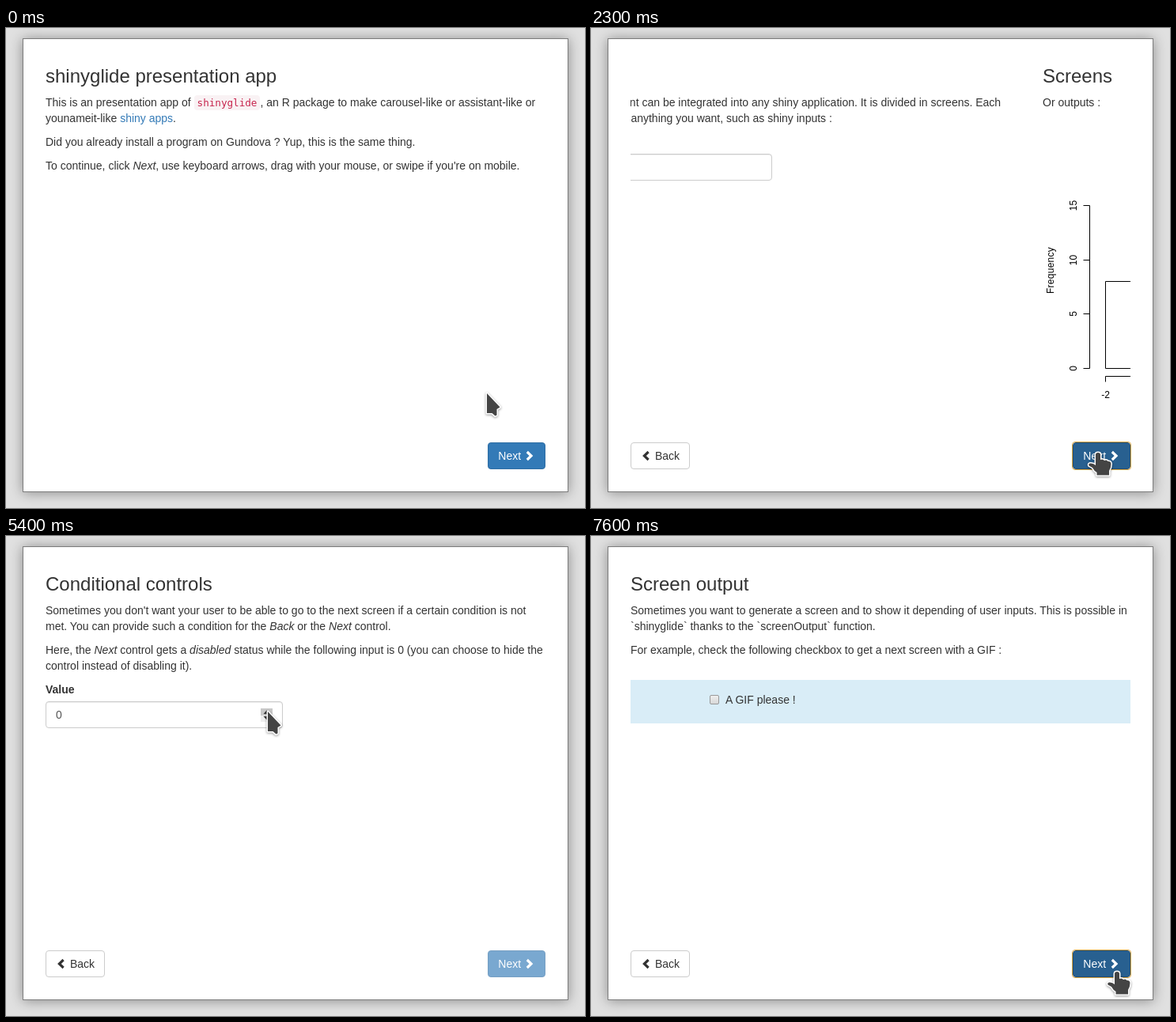
An HTML page that plays this animation: 732x607 px, repeating every 8000 ms.

```html
<!DOCTYPE html>
<html lang="en">
<head>
<meta charset="utf-8">
<title>Carousel app demo</title>
<style>
html, body { margin: 0; width: 100%; height: 100%; overflow: hidden; }
body { position: relative; background: #e0e0e0; color: #333; font: 14px/20px "Liberation Sans", Arial, sans-serif; }
* { box-sizing: border-box; }
.panel { position: absolute; left: 21px; top: 13px; width: 690px; height: 574px; background: #fff; border: 1px solid #7c7c7c; box-shadow: 0 1px 15px rgba(0,0,0,.38); }
.view { position: absolute; left: 50px; top: 0; width: 632px; height: 520px; overflow: hidden; }
.track { position: absolute; left: 0; top: 0; height: 520px; }
.slide { position: absolute; top: 0; width: 632px; height: 520px; padding-top: 47.6px; white-space: nowrap; }
h3 { margin: 0 0 10px; font-size: 24px; font-weight: 400; line-height: 26.4px; }
p { margin: 0 0 10px; }
a { color: #337ab7; }
code { font: 12.6px/1 "DejaVu Sans Mono", monospace; padding: 2px 4px; color: #c7254e; background: #f9f2f4; border-radius: 4px; }
.label { font-weight: 700; margin-bottom: 5px; }
.input { position: relative; width: 300px; height: 34px; padding: 6px 12px; color: #555; background: #fff; border: 1px solid #ccc; border-radius: 4px; box-shadow: inset 0 1px 1px rgba(0,0,0,.075); }
.input.focus { border-color: #66afe9; }
.input.glow { box-shadow: inset 0 1px 1px rgba(0,0,0,.075), 0 0 8px rgba(102,175,233,.6); }
.caret { position: absolute; left: 20px; top: 8px; width: 1px; height: 16px; background: #222; }
.spin { position: absolute; left: 271px; top: 8px; }
.bar { position: absolute; left: 0; top: 182px; width: 632px; height: 55px; background: #d9edf7; padding: 15px 0 0 120px; }
.box { position: absolute; left: 100px; top: 19px; width: 12px; height: 12px; border: 1px solid #999; border-radius: 2px; background: linear-gradient(#eee, #d8d8d8); }
.btn { position: absolute; top: 524px; height: 34px; padding: 6px 12px; border: 1px solid #ccc; border-radius: 4px; background: #fff; white-space: nowrap; }
.btn svg { width: 14px; height: 14px; vertical-align: -2px; fill: none; stroke: currentColor; stroke-width: 3.2; }
#back { left: 50px; }
#next { right: 50px; color: #fff; background: #337ab7; border-color: #2e6da4; }
#next.hover { background: #286090; border-color: #204d74; }
#next.off { opacity: .65; }
#ring { position: absolute; left: 608px; top: 523px; width: 75px; height: 36px; border: 1.5px solid #d9a441; border-radius: 4px; }
.wrap { position: absolute; left: 0; top: 0; width: 732px; height: 607px; overflow: hidden; }
#mouse { position: absolute; left: 0; top: 0; filter: drop-shadow(0 1px 1.5px rgba(0,0,0,.4)); }
.plot { position: absolute; left: 0; top: 0; font: 12px "Liberation Sans", Arial, sans-serif; }
</style>
</head>
<body>
<div class="wrap">
  <div class="panel"></div>
  <div class="view"><div class="track" id="track">
    <div class="slide">
      <h3>shinyglide presentation app</h3>
      <p>This is an presentation app of <code>shinyglide</code>, an R package to make carousel-like or assistant-like or<br>younameit-like <a>shiny apps</a>.</p>
      <p>Did you already install a program on Gundova ? Yup, this is the same thing.</p>
      <p>To continue, click <em>Next</em>, use keyboard arrows, drag with your mouse, or swipe if you're on mobile.</p>
    </div>
    <div class="slide">
      <h3>Screens</h3>
      <p>A <code>glide</code> component can be integrated into any shiny application. It is divided in screens. Each<br>screen can contain anything you want, such as shiny inputs :</p>
      <div class="label">n value :</div>
      <div class="input">100</div>
    </div>
    <div class="slide">
      <h3>Screens</h3>
      <p>Or outputs :</p>
      <svg class="plot" id="plot" width="632" height="520"></svg>
    </div>
    <div class="slide">
      <h3>Conditional controls</h3>
      <p>Sometimes you don't want your user to be able to go to the next screen if a certain condition is not<br>met. You can provide such a condition for the <em>Back</em> or the <em>Next</em> control.</p>
      <p>Here, the <em>Next</em> control gets a <em>disabled</em> status while the following input is 0 (you can choose to hide the<br>control instead of disabling it).</p>
      <div class="label">Value</div>
      <div class="input" id="field"><span id="value">0</span><i class="caret" id="caret"></i>
        <svg class="spin" id="spin" width="15" height="17"><rect width="15" height="17" fill="#eee"/><rect id="up" width="15" height="9" fill="#c8c8c8"/><path d="M3.5 7L7.5 2.5L11.5 7ZM3.5 10L7.5 14.5L11.5 10Z" fill="#333"/></svg>
      </div>
    </div>
    <div class="slide">
      <h3>Screen output</h3>
      <p>Sometimes you want to generate a screen and to show it depending of user inputs. This is possible in<br>`shinyglide` thanks to the `screenOutput` function.</p>
      <p>For example, check the following checkbox to get a next screen with a GIF :</p>
      <div class="bar"><i class="box"></i>A GIF please !</div>
    </div>
  </div></div>
  <div class="btn" id="back"><svg><path d="M9.6 2L4.4 7L9.6 12"/></svg> Back</div>
  <div class="btn" id="next">Next <svg><path d="M3.8 2L9 7L3.8 12"/></svg></div>
  <div id="ring"></div>
  <svg id="mouse" width="732" height="607"><g id="cursor" fill="#444" stroke="#fff" stroke-width="3" stroke-linejoin="round" paint-order="stroke">
    <path id="arrow" d="M0 0L16.5 17.5L12.5 20V27.5L10.5 28.5L6.5 25H0Z"/>
    <path id="hand" d="M-3 2.5Q-3 0 0 0Q3 0 3 2.5V9Q6 7.500 8 10Q11 8.500 12.500 11Q16 10.500 16.500 14Q16.500 19 14 23V28.500H-1.500V25Q-5 23 -7 19L-11.500 16.500Q-12.500 14 -10 13.500Q-6 13 -3 16Z"/>
    <g id="ban" fill="none"><circle cx="30" cy="41" r="7" stroke-width="6"/><path d="M25 36L35 46M23 41a7 7 0 1 0 14 0a7 7 0 1 0 -14 0" stroke="#444"/></g>
  </g></svg>
</div>
<script>
const $ = id => document.getElementById(id);
const LOOP = 8000, PITCH = 642, SLIDE_MS = 400;

// [time, x, y, kind]; kinds: 0 arrow, 1 hand, 2 not allowed
const path = [
  [0, 608, 462, 0], [400, 609, 464, 0], [500, 613, 474, 0], [600, 622, 495, 0], [700, 632, 518, 0],
  [800, 639, 532, 1], [900, 641, 537, 1], [3800, 635, 526, 2], [4100, 653, 534, 0],
  [4300, 462, 329, 0], [4500, 378, 248, 0], [4700, 355, 234, 0], [4900, 348, 225, 0],
  [5000, 340, 212, 0], [5100, 334, 206, 0], [5200, 331, 211, 0], [5300, 331, 217, 0],
  [5400, 331, 222, 0], [6000, 331, 225, 0], [6200, 415, 300, 0], [6300, 540, 430, 0],
  [6400, 625, 510, 0], [6500, 672, 568, 0], [6700, 673, 568, 0], [6800, 668, 555, 1], [7000, 665, 551, 1]
];
// [time, total slide time played]
const travel = [
  [0, 0], [1100, 20.3], [1200, 120], [1300, 220], [1400, 320], [1500, 400], [2300, 420.3], [2400, 520],
  [2900, 800], [3600, 918], [3700, 1018], [3800, 1200], [7300, 1318], [7600, 1600]
];

const at = (keys, t) => keys.filter(k => k[0] <= t).pop();
const show = (id, on) => { $(id).style.visibility = on ? "inherit" : "hidden"; };
const easeOut = u => 1 - (1 - u) ** 4;

function drawPlot() {
  const counts = [8, 9, 13, 18, 16, 15, 10, 8, 2, 1];
  const snap = v => Math.round(v) + .5;
  const X = v => snap(79 + (v + 2) * 100.4), Y = n => snap(430 - n * 13.73);
  const text = (x, y, s, extra = "") => `<text x="${x}" y="${y}" text-anchor="middle" ${extra}>${s}</text>`;
  const side = (x, y, s, extra = "") => text(0, 0, s, `transform="translate(${x} ${y}) rotate(-90)" ${extra}`);
  let lines = `M59.5 ${Y(0)}V${Y(15)}M${X(-2)} 440.5H${X(3)}`, labels = "";
  counts.forEach((n, i) => {
    const v = -2 + i / 2;
    lines += `M${X(v)} ${Y(0)}V${Y(n)}H${X(v + .5)}V${Y(0)}Z`;
  });
  for (let n = 0; n <= 15; n += 5) {
    lines += `M59.5 ${Y(n)}h-8`;
    labels += side(43, Y(n), n);
  }
  for (let v = -2; v <= 3; v++) {
    lines += `M${X(v)} 440.5v7`;
    labels += text(X(v), 468, v);
  }
  labels += side(14, 306.5, "Frequency", 'letter-spacing=".25"') + text(330, 497, "x")
    + text(330, 148, "Histogram of x", 'font-size="14.4" font-weight="700"');
  $("plot").innerHTML = `<path d="${lines}" fill="none" stroke="#000"/>${labels}`;
}

function render(t) {
  const played = at(travel, t)[1], page = Math.floor(played / SLIDE_MS);
  const shift = (page + easeOut(played / SLIDE_MS - page)) * PITCH;
  $("track").style.transform = `translateX(${-Math.round(shift)}px)`;

  const [, x, y, kind] = at(path, t);
  $("cursor").setAttribute("transform", `translate(${x} ${y})`);
  show("arrow", kind !== 1);
  show("hand", kind === 1);
  show("ban", kind === 2);

  const focused = t >= 5700, disabled = t >= 3800 && !focused;
  const inField = t >= 3800 && x < 350 && y > 209 && y < 243;
  $("value").textContent = focused ? 1 : 0;
  $("field").classList.toggle("focus", focused);
  $("field").classList.toggle("glow", t >= 6000);
  show("caret", focused && (t < 6200 || t >= 6700));
  show("spin", focused || inField);
  show("up", inField && y < 227);

  show("back", t >= 1500);
  show("ring", (t >= 1000 && t < 3800) || t >= 7300);
  $("next").classList.toggle("hover", kind === 1);
  $("next").classList.toggle("off", disabled);
}

document.querySelectorAll(".slide").forEach((s, i) => { s.style.left = i * PITCH + "px"; });
drawPlot();
const start = performance.now();
function tick() {
  render((performance.now() - start) % LOOP);
  requestAnimationFrame(tick);
}
tick();
</script>
</body>
</html>
```
